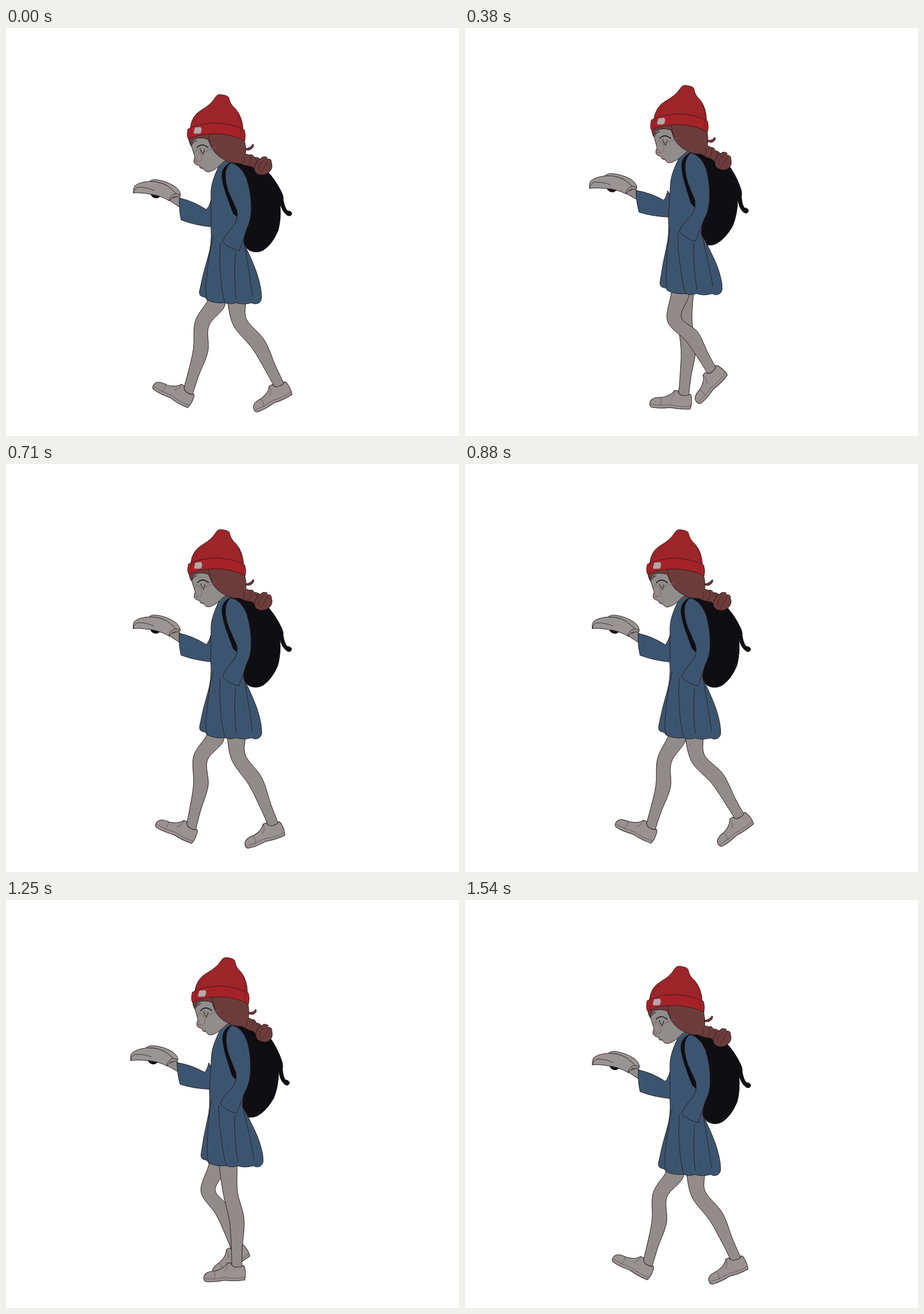
Animation of 789x710 px, one loop 1.58 s. Source, as an HTML page:

```html
<!DOCTYPE html>
<html lang="en">
<head>
<meta charset="utf-8">
<title>Walking and reading</title>
<style>
html, body { margin: 0; width: 100%; height: 100%; overflow: hidden; background: #fff; }
svg { display: block; }
path { stroke-linejoin: round; stroke-linecap: round; }
</style>
</head>
<body>
<svg id="stage" width="789" height="710" viewBox="0 0 789 710"></svg>
<script>
const LOOP = 1580, FPS = 24, COUNT = 38, HALF = COUNT / 2;
const INK = '#2c1d20', SKIN = '#918c8b', SHOE = '#989392', BLUE = '#3b5570',
      HAIR = '#6c3c3b', BLACK = '#0f0e13', PAGE = '#999594';
const stage = document.getElementById('stage');

function add(tag, attrs, parent = stage) {
  const el = document.createElementNS('http://www.w3.org/2000/svg', tag);
  for (const k in attrs) el.setAttribute(k, attrs[k]);
  parent.append(el);
  return el;
}
const shape = (d, fill, stroke = INK, width = 1, parent = stage) =>
  add('path', { d, fill, stroke, 'stroke-width': width }, parent);

// How far a point travels between the lowest and the highest pose.
const turn = (px, py, dx, dy, rate) => (x, y) => [dx - rate * (y - py), dy + rate * (x - px)];
const bookArm = turn(357, 330, -2, -17, -0.067);
const nearArm = turn(402, 245, 2, -17, 0.05);
const pack = turn(400, 240, 6, -16.5, 0.125);
const dress = (x, y) => [3 * Math.cos((y - 240) / 37), -16];
const head = (x, y) => {
  const back = Math.max(0, x - 410);
  return [5 + (235 - y) * 0.05 - back * 0.08, -16 + back * 0.2];
};

const soft = [];
function body(rule, d, fill = 'none', stroke = INK, width = 1) {
  const parts = d.split(/(-?[\d.]+ -?[\d.]+)/).map(s => {
    if (!/\d/.test(s)) return s;
    const [x, y] = s.split(' ').map(Number);
    return [x, y, ...rule(x, y)];
  });
  soft.push({ el: shape('', fill, stroke, width), parts });
}
const bend = (parts, b) => parts.map(p => typeof p === 'string' ? p :
  (p[0] + p[2] * b).toFixed(2) + ' ' + (p[1] + p[3] * b).toFixed(2)).join('');

// Sum of harmonics: mean, then cosine and sine of each overtone.
function wave(a, mean, ...amps) {
  return amps.reduce((sum, v, i) => {
    const k = (i >> 1) + 1;
    return sum + v * (i % 2 ? Math.sin(k * a) : Math.cos(k * a));
  }, mean);
}

// Gait: angle 0 is the heel strike, half a turn later the leg trails.
const gait = a => ({
  hip: [wave(a, 381, -18, 5.3, 3, 1.4), wave(a, 471.5, 0, 0, 7.5)],
  knee: [wave(a, 374, -33.4, 10.3, 0.8, 3.9, 0, -1.7), wave(a, 511.3, 0.5, 2, 2.7, 2)],
  ankle: [wave(a, 400, -77.4, -15.7, -4, 5.5, -1.5, 2.7), wave(a, 621.5, 7, 17, 4.6, -5.5, -1.3, -2.7)],
  tilt: wave(a, -10.3, 27.5, 19.9, 11, -6.2, 0, -2.8)
});

const at = p => p[0].toFixed(2) + ' ' + p[1].toFixed(2);
function spline(pts) {
  let d = '';
  for (let i = 0; i < pts.length - 1; i++) {
    const a = pts[Math.max(i - 1, 0)], b = pts[i], c = pts[i + 1], e = pts[Math.min(i + 2, pts.length - 1)];
    d += 'C' + at([b[0] + (c[0] - a[0]) / 6, b[1] + (c[1] - a[1]) / 6]) + ' ' +
      at([c[0] - (e[0] - b[0]) / 6, c[1] - (e[1] - b[1]) / 6]) + ' ' + at(c);
  }
  return d;
}

function legPath({ hip, knee, ankle }) {
  const vx = ankle[0] - knee[0], vy = ankle[1] - knee[1], len = Math.hypot(vx, vy);
  const shin = (t, out) => [knee[0] + vx * t + vy / len * out, knee[1] + vy * t - vx / len * out];
  const mid = [[hip[0], hip[1] - 25], hip, knee, shin(0.38, 7), shin(0.75, 3), shin(1.03, 0)];
  const half = [16, 15.5, 12.5, 12.8, 9.6, 8.8];
  const front = [], back = [];
  mid.forEach((p, i) => {
    const a = mid[Math.max(i - 1, 0)], b = mid[Math.min(i + 1, mid.length - 1)];
    const l = Math.hypot(b[0] - a[0], b[1] - a[1]);
    const nx = (a[1] - b[1]) / l * half[i], ny = (b[0] - a[0]) / l * half[i];
    front.push([p[0] + nx, p[1] + ny]);
    back.unshift([p[0] - nx, p[1] - ny]);
  });
  return 'M' + at(front[0]) + spline(front) + 'L' + at(back[0]) + spline(back) + 'Z';
}

function makeLeg(offset) {
  const limb = shape('', SKIN), foot = add('g', {});
  shape('M-58 20C-58 11 -50 8 -38 8C-28 6 -20 2 -16 -5L-10 -5Q-8 3 0 3Q8 4 11 0Q14 2 14 6Q16 16 13 26Q-4 28 -22 25Q-40 28 -54 26Q-58 25 -58 20Z', SHOE, INK, 1, foot);
  shape('M-56 21Q-40 23 -22 20Q0 24 14 21M-40 8Q-36 14 -40 22M-16 -5Q-15 4 -22 10', 'none', '#54494a', 0.7, foot);
  return n => {
    const pose = gait((n + offset) / COUNT * 2 * Math.PI);
    limb.setAttribute('d', legPath(pose));
    foot.setAttribute('transform', `translate(${at(pose.ankle)}) rotate(${pose.tilt.toFixed(2)})`);
  };
}

const legs = [makeLeg(0), makeLeg(HALF)];

// Book, hand and far sleeve
body(bookArm, 'M252 289Q254 296 263 296L269 293Z', BLACK);
body(bookArm, 'M284 293L296 290L305 297L303 312L292 305L283 299Z', SKIN);
body(bookArm, 'M250 267Q254 263 262 264Q280 266 296 277Q304 284 304 291L290 296Z', PAGE);
body(bookArm, 'M222 287Q221 281 224 275Q232 268 250 267Q276 267 290 282L297 289Q288 291 285 301Q268 291 250 289Q234 286 222 287Z', PAGE);
body(bookArm, 'M222 287Q224 279 230 277Q246 277 258 283', 'none', INK, 0.8);
body(bookArm, 'M284 300Q286 290 296 288Q303 289 304 293L292 294Z', SKIN, INK, 0.8);
body(bookArm, 'M302 296Q326 301 349 316Q354 311 357 300L366 320L362 346L357 346Q328 343 305 334Q301 316 302 296Z', BLUE);

// Pack and dress
body(pack, 'M477 303Q480 319 490 326Q497 329 498 322Q496 318 490 318Q485 312 483 300Z', BLACK, BLACK);
body(pack, 'M388 237Q396 231 412 233Q436 235 452 246Q468 262 479 284Q485 296 482 301L477 304Q480 330 474 352Q464 376 449 386Q437 393 424 387Q414 380 404 360L392 260Z', BLACK, BLACK);
body(dress, 'M371 240Q378 231 387 230L402 239Q416 254 420 290L414 374Q428 402 437 427Q446 455 445 471Q443 481 432 480Q428 477 424 479Q412 482 400 478Q392 482 380 478Q364 480 350 473Q348 468 341 467Q336 465 337 458Q343 427 352 398Q359 376 357 346L357 284Q358 266 371 240Z', BLUE);
body(dress, 'M361 363Q352 400 349 438Q346 458 350 473M373 374Q371 404 374 436Q376 460 381 478M400 391Q396 432 401 471M415 376Q423 418 429 466', 'none', INK, 0.9);

// Strap and near sleeve
body(nearArm, 'M392 234Q377 240 376 256Q376 266 383 288L396 323L404 330L404 310L390 260Z', BLACK, BLACK);
body(nearArm, 'M391 235Q409 238 419 262Q428 290 427 320Q426 337 419 350L412 372L406 388Q389 384 377 372Q382 360 395 346Q406 332 402 317L388 286Q380 264 383 248Q386 239 391 235Z', BLUE);

// Head and braid
body(head, 'M320 190Q322 200 324 209L329 224Q325 234 330 237Q334 239 338 240Q335 244 344 245Q348 252 355 250Q366 246 372 239Q378 232 387 229L375 186Z', '#908d8b');
body(head, 'M372 239Q380 234 387 229', 'none', '#8c5a44');
body(head, 'M318 188Q318 200 323 206Q323 195 332 192Q344 190 352 194L357 206Q364 221 380 229Q392 236 405 235Q416 240 428 241Q435 247 440 249L444 229Q438 224 432 225Q430 219 424 221L417 219Q419 208 414 192L365 180Z', HAIR);
body(head, 'M417 210Q426 209 430 202Q433 204 429 209Q424 214 418 212Z', '#743039');
body(head, 'M443 228Q446 222 455 225L453 228Q463 227 462 233Q466 244 458 251Q449 258 438 254Q431 250 433 241Q436 231 443 228Z', HAIR);
body(head, 'M413 224Q419 229 412 236M424 222Q430 230 422 238M433 226Q440 230 434 239M448 232Q438 236 440 248M456 231Q450 244 444 251M352 185Q354 196 358 207', 'none', '#3d2022', 0.9);
body(head, 'M333 208Q341 199 352 208', 'none', '#17141b', 1.6);
body(head, 'M338 210Q340 216 344 220M346 211L344 218M325 202Q327 197 332 196', 'none', INK, 1.1);
body(head, 'M331 212Q325 219 331 229Q338 237 341 228Q342 217 331 212M341 218L366 207', 'none', '#805c58', 0.9);
body(head, 'M328 233Q330 231 334 234M338 243L344 243', 'none', '#8a4c49');

// Hat
body(head, 'M321 174Q323 153 340 143Q357 133 363 123Q368 114 375 116Q385 117 388 121Q390 133 400 141Q412 155 413 177Z', '#9c262a', '#4a1719');
body(head, 'M317 176Q332 167 365 165Q396 167 415 177Q418 186 416 196Q395 185 365 184Q333 184 318 194Q314 188 317 176Z', '#a62229', '#4a1719');
body(head, 'M402 146Q409 157 409 173M328 165Q333 153 343 145M323 173L322 191M409 175L410 192', 'none', '#781a20', 0.8);
body(head, 'M329 173L338 172Q341 173 341 177L340 182Q339 184 335 184L329 184Q326 184 327 180Z', '#b3aaa8', '#7d4444', 0.6);

// Height of the body, twice per loop; the second rise is a little later.
function bob(n) {
  let q = n % HALF / HALF;
  if (n >= HALF) q -= 0.03 * Math.sin(Math.PI * q);
  return 0.5 - 0.5 * Math.cos(2 * Math.PI * q);
}

function draw(ms) {
  const t = Math.floor((ms % LOOP) / 10) * 10;
  const n = Math.min(COUNT - 1, Math.floor((t + 5.01) * FPS / 1000));
  const b = bob(n);
  legs.forEach(move => move(n));
  for (const s of soft) s.el.setAttribute('d', bend(s.parts, b));
}

const start = performance.now();
function tick() {
  draw(Math.max(0, performance.now() - start));
  requestAnimationFrame(tick);
}
tick();
</script>
</body>
</html>
```
